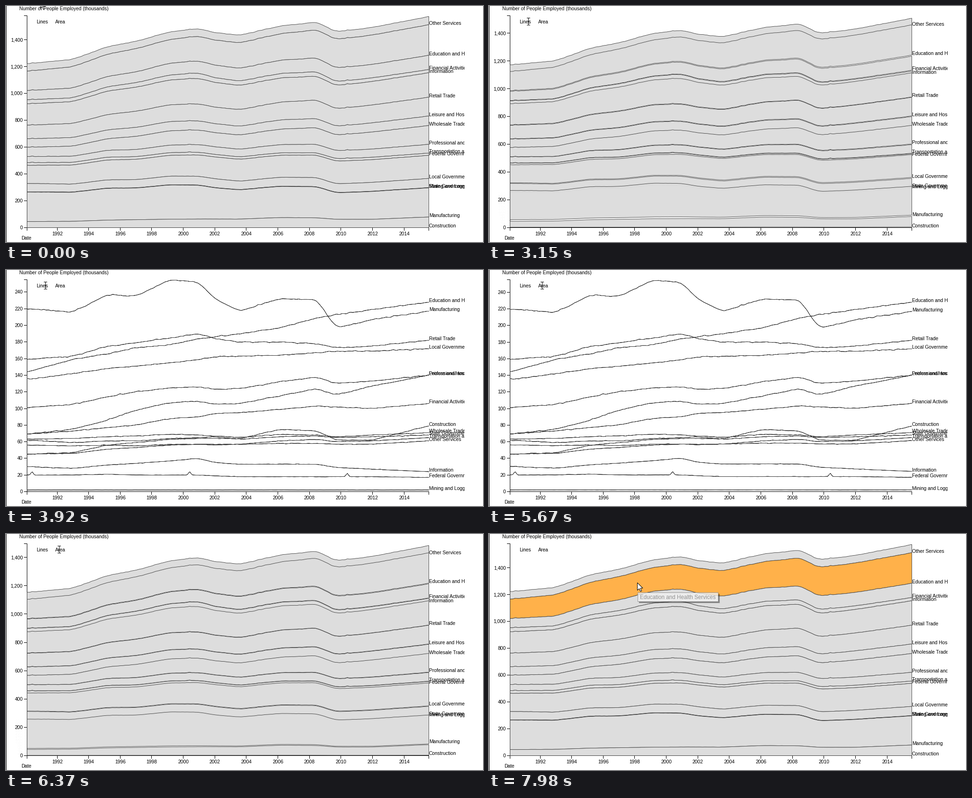
A matplotlib script for the animation above (8000 ms loop, 1008 by 501 pixels).

```python
import numpy as np
import matplotlib.pyplot as plt
from matplotlib.animation import FuncAnimation
from matplotlib.patches import Polygon, Rectangle

W, H, DPI = 1008, 501, 100
PX = 72 / DPI                      # one pixel in points
STEP, INTERVAL, LOOP = 70, 40, 8000
LEFT, RIGHT, TOP, BASE = 44.5, 893.5, 20.5, 470.5
LINE_SCALE, AREA_SCALE = 1.7647, 0.285   # pixels per thousand people
YEAR_WIDTH = 33.33
GREY, ORANGE, INK = (221 / 255,) * 3, (1.0, 0.695, 0.29), "#3a3a3a"

plt.rcParams.update({"font.family": "Liberation Sans", "path.snap": False})
rng = np.random.default_rng(7)

# Employment in thousands at the turning points, bottom of the stack first.
TURNS = [1990.1, 1993, 1995.2, 1997, 1999.2, 2001, 2002,
         2003.6, 2006.1, 2008.5, 2009.7, 2012, 2015.6]
LEVELS = {
    "Construction": [45, 47, 56, 59, 63, 64, 64, 63.5, 75, 73, 62, 62, 79],
    "Manufacturing": [220, 216, 237, 235, 255, 252, 232, 217, 232, 231, 197, 207, 217],
    "Mining and Logging": [2] * 13,
    "State Government": [62, 59, 61, 61, 64, 65, 66, 63, 66, 67, 65, 66, 68],
    "Local Government": [135, 142, 148, 151, 155, 159, 162, 163, 164, 167, 169, 169, 172],
    "Federal Government": [20, 20, 21, 20, 20, 20, 19, 18, 18, 18, 18, 18, 17],
    "Transportation and Utilities": [45, 46, 51, 53, 56, 57, 57, 57, 61, 63, 60, 61, 65],
    "Professional and Business Services":
        [69, 75, 86, 98, 107, 109, 105, 106, 115, 124, 116, 127, 140],
    "Wholesale Trade": [63, 64, 66, 67, 69, 68, 67, 65, 69, 68, 66, 68, 71],
    "Leisure and Hospitality":
        [101, 105, 114, 120, 125, 126, 123, 124, 132, 138, 130, 133, 140],
    "Retail Trade": [159, 163, 175, 179, 185, 190, 184, 180, 180, 178, 173, 175, 182],
    "Information": [30, 28, 32, 34, 37, 40, 35, 33, 33, 33, 29, 27, 24],
    "Financial Activities": [69, 73, 77, 80, 88, 90, 94, 95, 99, 103, 102, 100, 106],
    "Education and Health Services":
        [144, 159, 166, 173, 177, 184, 186, 190, 197, 209, 213, 219, 228],
    "Other Services": [56, 55, 56, 55, 57, 57, 56, 57, 58, 58, 57, 57, 61],
}
names = list(LEVELS)
xs = np.linspace(LEFT, RIGHT, 307)
years = np.linspace(TURNS[0], TURNS[-1], xs.size)


def monthly(levels):
    """Monthly values: rounded turning points plus a little jitter."""
    months = 9
    curve = np.pad(np.interp(years, TURNS, levels), months // 2,
                   mode="reflect", reflect_type="odd")
    curve = np.convolve(curve, np.ones(months) / months, "valid")
    jitter = rng.laplace(0, 0.02 * np.sqrt(np.mean(levels)), xs.size)
    return curve + np.convolve(jitter, [0.3, 0.6, 0.3], "same")


values = np.array([monthly(levels) for levels in LEVELS.values()])
# Census workers every ten years
values[names.index("Federal Government")] += 4 * np.exp(-((years % 10 - 0.42) / 0.1) ** 2)

stack = np.cumsum(values, axis=0)
line_y = BASE - LINE_SCALE * values
upper_y = BASE - AREA_SCALE * stack
lower_y = BASE - AREA_SCALE * (stack - values)

fig = plt.figure(figsize=(W / DPI, H / DPI), dpi=DPI, facecolor="white")
ax = fig.add_axes([0, 0, 1, 1])
ax.set(xlim=(0, W), ylim=(H, 0))
ax.axis("off")


def text(x, y, s, size=10.3, z=5, **kw):
    return ax.text(x, y, s, fontsize=size * PX, zorder=z, **kw)


def stroke(x, y, z=1):
    return ax.plot(x, y, color="black", lw=PX, zorder=z)[0]


def box(x, y, w, h, z=7, fc="none", ec="none"):
    return ax.add_patch(Rectangle((x, y), w, h, fc=fc, ec=ec, lw=PX, zorder=z))


# Fixed parts
stroke([0.5, 0.5], [0, H])
stroke([38.5, LEFT, LEFT, 38.5], [TOP, TOP, BASE, BASE])
stroke([LEFT, LEFT, RIGHT, RIGHT], [476.5, BASE, BASE, 476.5])
for year in range(1992, 2015, 2):
    x = int(108 + (year - 1992) * YEAR_WIDTH) + 0.5
    stroke([x, x], [BASE, 476.5])
    text(x, 487, str(year), ha="center")
text(28, 9, "Number of People Employed (thousands)")
text(64, 36.5, "Lines")
text(104, 36.5, "Area")
text(32, 496.5, "Date")
box(969, 0, W - 969, H, z=6, fc="white")

# Moving parts
line_ticks = set(range(0, 241, 20))
area_ticks = set(range(0, 1401, 200))
ticks = [(v, stroke([38.5, LEFT], [0, 0]), text(35.5, 0, f"{v:,}", ha="right"))
         for v in sorted(line_ticks | area_ticks)]
band_x = np.concatenate([xs, xs[::-1]])
# The bottom of the stack is painted last.
bands = [ax.add_patch(Polygon(np.column_stack([band_x, band_x]), ec=INK, lw=0.85 * PX,
                              joinstyle="round", zorder=3 - 0.01 * i))
         for i in range(len(names))]
labels = [text(894, 0, name) for name in names]

ARROW = np.array([(0, 0), (0, 16), (4, 12.5), (6.5, 18.5), (9, 17.5),
                  (6.5, 11.5), (11.5, 11.5)])
arrow = ax.add_patch(Polygon(ARROW, fc="white", ec="black", lw=PX, zorder=9))
BEAM_X = np.array([-3, 3, np.nan, 0, 0, np.nan, -3, 3])
BEAM_Y = np.array([-7.5, -7.5, np.nan, -7.5, 7.5, np.nan, 7.5, 7.5])
beam = stroke(BEAM_X, BEAM_Y, 9)

# Tooltip parts with their full opacity
tip = [(text(319, 137.5, "Education and Health Services", 11.6, 8, color="#575757"), 0.6),
       (box(314, 124, 170, 19, fc="#f0f0f0"), 0.8),
       (box(314.5, 124.5, 170, 19, ec="#767676"), 0.7)]
for grow, shade in ((3, 0.18), (2, 0.3)):
    tip.append((box(485, 127, grow, 17 + grow, fc="black"), shade))
    tip.append((box(317, 144, 168, grow, fc="black"), shade))


def ease(u):
    u = min(max(u, 0), 1)
    return 4 * u ** 3 if u < 0.5 else 1 - 4 * (1 - u) ** 3


def line_mix(t):
    """0 for the stacked view, 1 for the line view."""
    return ease((t - 3047) / 870) - ease((t - 5620) / 870)


def lerp(a, b, u):
    return a + (b - a) * u


def cursor(t):
    """Kind and position of the pointer."""
    if t < 70:
        return "arrow", 72.5, -11.5
    if t < 910:
        return None, 0, 0
    if t < 1750:
        when = [910, 1190, 1540, 1680]
        return ("arrow", np.interp(t, when, [109.5, 106, 83, 91]),
                np.interp(t, when, [-14, -3, 22, 29]))
    if t < 4760:
        return "beam", round(np.interp(t, [1750, 1890], [88, 83])) + 0.5, 33
    if t < 4970:
        return "arrow", np.interp(t, [4760, 4900], [89.5, 103]), 32
    if t < 6930:
        return "beam", (111.5 if t < 5110 else 112.5), 33
    u = min((t - 6860) / 630, 1)
    u = u * u * (3 - 2 * u)
    return "arrow", lerp(112.5, 313.5, u), lerp(33, 103.5, u)


def hovered(x, y):
    k = int(np.argmin(np.abs(xs - x)))
    hit = np.flatnonzero((upper_y[:, k] <= y) & (y < lower_y[:, k]))
    return hit[0] if hit.size else None


def update(frame):
    t = (frame * INTERVAL + 30) // STEP * STEP   # the picture holds for each step
    axis_mix = line_mix(t)
    band_mix = line_mix(t + 18)      # the bands run slightly ahead of the axis
    kind, cx, cy = cursor(t)
    hot = hovered(cx, cy) if t >= 6930 else None

    scale = lerp(AREA_SCALE, LINE_SCALE, axis_mix)
    for v, mark, label in ticks:
        y = BASE - v * scale
        alpha = axis_mix * (v in line_ticks) + (1 - axis_mix) * (v in area_ticks)
        for artist in (mark, label):
            artist.set_visible(alpha > 0.004 and y > -8)
            artist.set_alpha(min(alpha, 1))
        row = np.floor(y) + 0.5
        mark.set_ydata([row, row])
        label.set_y(y + 3.5)

    for i, (band, label) in enumerate(zip(bands, labels)):
        top = lerp(upper_y[i], line_y[i], band_mix)
        low = lerp(lower_y[i], line_y[i], band_mix)
        band.set_xy(np.column_stack([band_x, np.concatenate([top, low[::-1]])]))
        band.set_facecolor((*(ORANGE if i == hot else GREY), 1 - band_mix))
        label.set_y(lerp(lower_y[i, -1], line_y[i, -1], axis_mix))

    arrow.set_visible(kind == "arrow")
    arrow.set_xy(ARROW + (cx, cy))
    beam.set_visible(kind == "beam")
    beam.set_data(BEAM_X + cx, BEAM_Y + cy)

    strength = 0 if t < 7910 else 0.5 if t < 7980 else 1
    for artist, full in tip:
        artist.set_visible(strength > 0)
        artist.set_alpha(full * strength)


anim = FuncAnimation(fig, update, frames=LOOP // INTERVAL, interval=INTERVAL,
                     init_func=lambda: update(0), repeat=True, repeat_delay=0,
                     blit=False)
plt.show()
```
